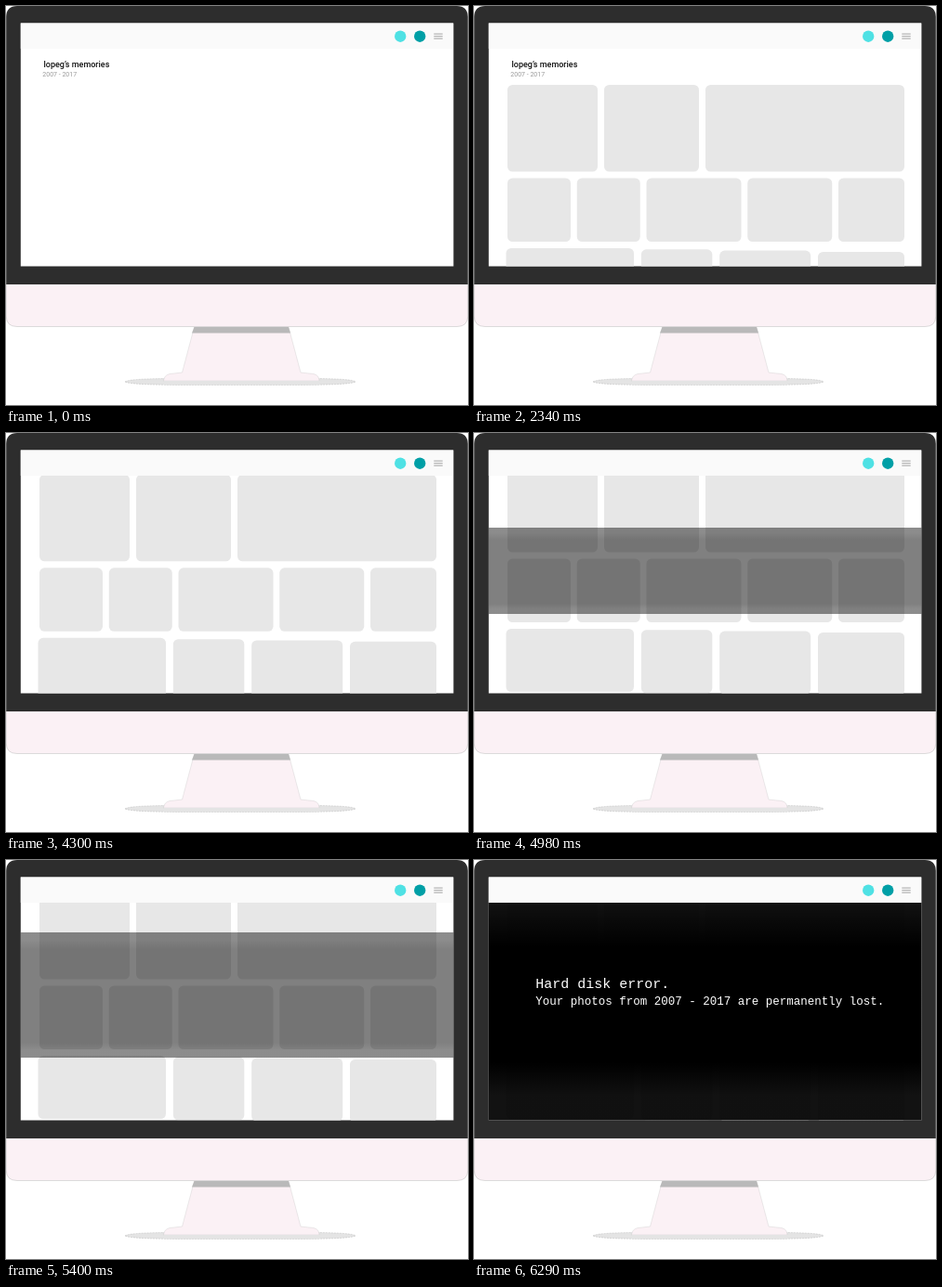
Animation, 497 px wide and 430 px high, one loop 6.72 s. Source, as an HTML page:

```html
<!DOCTYPE html>
<html lang="en">
<head>
<meta charset="utf-8">
<title>Lost memories</title>
<style>
  html, body { margin: 0; width: 100%; height: 100%; overflow: hidden; background: #fff; }
  svg { display: block; width: 497px; height: 430px; }
  .title { font: 500 9px Roboto, sans-serif; fill: #111; }
  .years { font: 400 7px Roboto, sans-serif; fill: #999; }
  .error { font-family: "Liberation Mono", "Courier New", monospace; fill: #fff; white-space: pre; }
</style>
</head>
<body>
<svg viewBox="0 0 497 430">
  <defs>
    <clipPath id="screen"><rect x="15.800" y="18.600" width="465.600" height="261.900"/></clipPath>
    <linearGradient id="bandFill" x2="0" y2="1">
      <stop offset=".06" stop-opacity=".9"/>
      <stop offset=".14"/>
      <stop offset=".88"/>
      <stop offset=".94" stop-opacity=".9"/>
    </linearGradient>
    <linearGradient id="blackoutFill" x2="0" y2="1">
      <stop offset="0" stop-opacity=".93"/>
      <stop offset=".2"/>
      <stop offset=".73"/>
      <stop offset=".88" stop-opacity=".93"/>
    </linearGradient>
  </defs>

  <!-- stand -->
  <path d="M128 405Q131 402 170 401.500H336Q374 402 376 405Q372 408 320 408.500H185Q132 408 128 405Z"
        fill="#e4e4e4" stroke="#aaa" stroke-width=".4" stroke-dasharray="2 1"/>
  <path d="M202.500 346H304L317 395L331 396.500Q337 398 337 404H169.500Q170 398 176 396.500L189.500 395Z"
        fill="#fbf1f5" stroke="#bbb" stroke-width=".3"/>
  <path d="M170 404H337V408.500H170Z" fill="#e4e4e4"/>
  <path d="M202.500 346H304L306 352.500H200Z" fill="#b9b9b9"/>

  <!-- case -->
  <path d="M.2 300H496.800V334Q496.800 345.500 485 345.500H12Q.2 345.500 .2 334Z" fill="#fbf1f5" stroke="#bbb" stroke-width=".5"/>
  <path d="M.2 300V12Q.2 0 12 0H485Q496.800 0 496.800 12V300Z" fill="#2d2d2d"/>

  <g clip-path="url(#screen)">
    <rect x="15" y="18" width="467" height="264" fill="#fff"/>
    <g id="page">
      <text class="title" x="40.500" y="66">lopeg’s memories</text>
      <text class="years" x="39.300" y="76">2007 - 2017</text>
      <g id="tiles" fill="#e7e7e7"></g>
    </g>
    <rect id="blackout" x="15" y="46" width="467" height="236" fill="url(#blackoutFill)"/>
    <rect x="15" y="18" width="466" height="28" fill="#fafafa"/>
    <circle cx="424.200" cy="32.700" r="6.200" fill="#4fe1e4"/>
    <circle cx="445.200" cy="32.700" r="6.200" fill="#009fa6"/>
    <path d="M460.300 30.200H469.700M460.300 32.700H469.700M460.300 35.200H469.700" stroke="#b5b5b5" stroke-width="1.300"/>
    <rect id="band" x="15" width="467" fill="url(#bandFill)" opacity=".5"/>
    <g id="message" class="error">
      <text x="66.300" y="138" font-size="15">Hard disk error.</text>
      <text x="66.300" y="156.300" font-size="12.500">Your photos from 2007 - 2017 are permanently lost.</text>
    </g>
  </g>
</svg>
<script>
const LOOP = 6720, STEP = 30, RIGHT = 463;
const $ = id => document.getElementById(id);
const page = $('page'), band = $('band'), blackout = $('blackout'), message = $('message');

const setAll = (el, attrs) => {
  for (const name in attrs) el.setAttribute(name, attrs[name]);
};

// Tiles arrive in pairs, a little faster each time.
function startOf(i) {
  const pair = i >> 1;
  return STEP * Math.round((210 + pair * (420 - 8 * pair) + 165 * (i % 2)) / STEP);
}

const tiles = [];
function addTile(attrs) {
  const el = document.createElementNS('http://www.w3.org/2000/svg', 'rect');
  setAll(el, { ...attrs, rx: 5.5 });
  $('tiles').append(el);
  const i = tiles.length, start = startOf(i);
  tiles.push({ el, start, faintFrom: i ? startOf(i - 1) + 2 * STEP : start });
}

// Justified row: even gaps between the left edge and the shared right edge.
function addRow({ y, height, widths, left = 36, slope = 0 }) {
  const total = widths.reduce((sum, width) => sum + width);
  const gap = (RIGHT - left - total) / (widths.length - 1);
  let x = left;
  widths.forEach((width, i) => {
    addTile({ x, y: y + slope * i, width, height });
    x += width + gap;
  });
}
addRow({ y: 85, height: 93.5, widths: [97, 102, 214] });
addRow({ y: 185.5, height: 68.5, widths: [68, 68, 102, 91, 71] });
addRow({ y: 261, height: 68, widths: [137.5, 76.5, 98, 93], left: 34.5, slope: 1.3 });

// Bands blink on every other step and grow with each blink.
const bursts = [
  { start: 3770, blinks: 2, center: 142.5, height: 3, growth: 0 },
  { start: 4090, blinks: 2, center: 142.5, height: 3, growth: 0 },
  { start: 4980, blinks: 2, center: 148.5, height: 93, growth: 90 },
  { start: 5340, blinks: 3, center: 145.5, height: 15, growth: 120 }
];

const progress = (t, start, steps) =>
  Math.max(0, Math.min(steps, Math.floor((t - start) / STEP) + 1)) / steps;
const ease = p => p * p * (3 - 2 * p);
const show = (el, on) => el.setAttribute('visibility', on ? 'visible' : 'hidden');

function drawTile({ el, start, faintFrom }, t) {
  const rise = 1 - (1 - progress(t, start, 3)) ** 3;
  setAll(el, {
    opacity: t < faintFrom ? 0 : 0.12 + 0.88 * rise,
    transform: `translate(0 ${8.7 * (1 - rise)})`
  });
}

function drawBand(t) {
  const burst = bursts.findLast(({ start }) => t >= start);
  const step = burst ? Math.floor((t - burst.start) / STEP) : -1;
  const on = step >= 0 && step % 2 === 0 && step < 2 * burst.blinks;
  show(band, on);
  if (!on) return;
  const height = burst.height + burst.growth * step / 2;
  setAll(band, { y: burst.center - height / 2, height });
}

function draw(t) {
  for (const tile of tiles) drawTile(tile, t);
  const scroll = 25 * (ease(progress(t, 3210, 14)) + ease(progress(t, 4090, 14)));
  page.setAttribute('transform', `translate(0 ${-scroll})`);
  drawBand(t);
  show(blackout, t >= 5490);
  message.setAttribute('opacity', progress(t, 6020, 10));
}

function tick() {
  draw(performance.now() % LOOP);
  requestAnimationFrame(tick);
}
tick();
</script>
</body>
</html>
```
